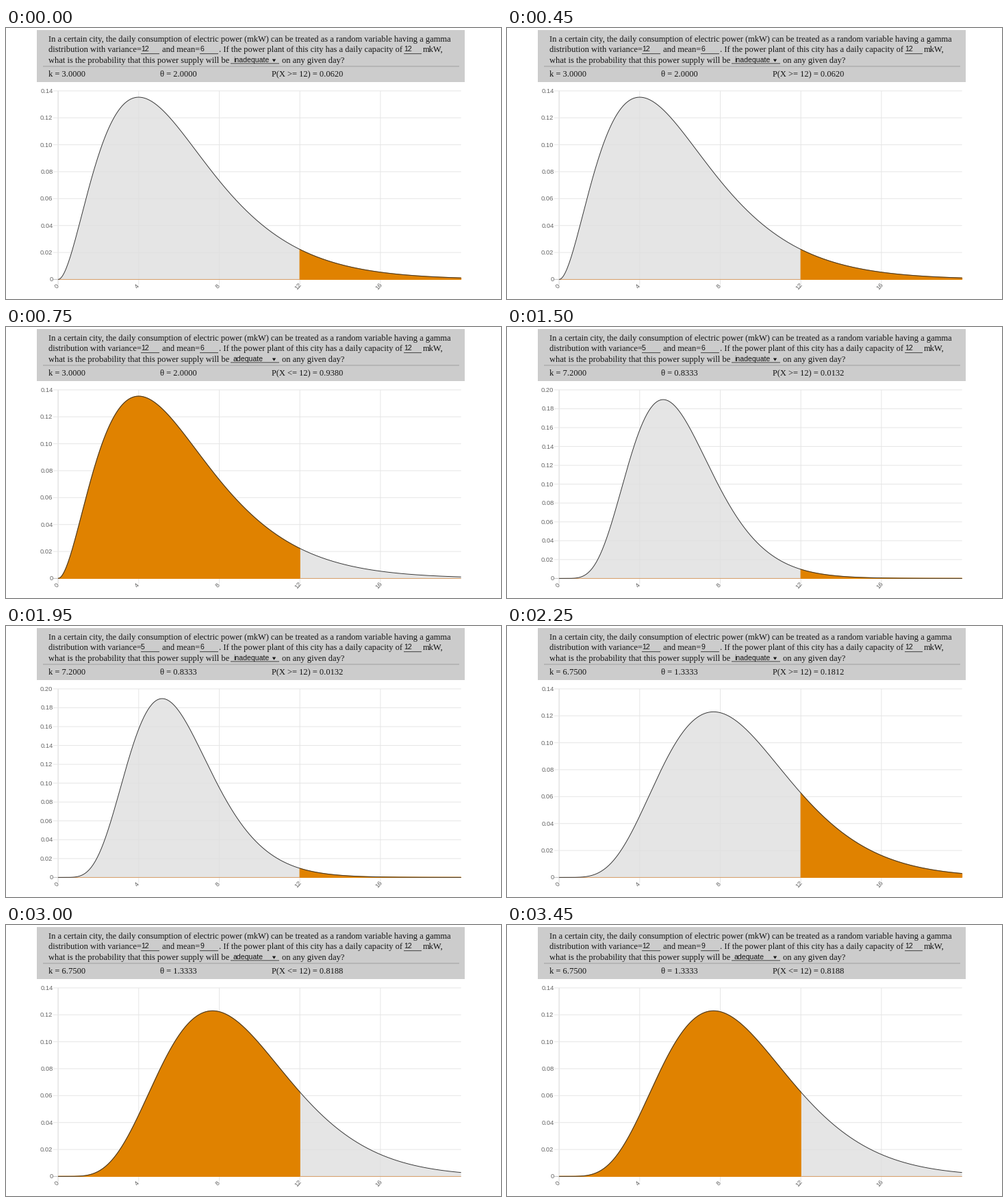
Write a matplotlib script that moves like this. It is 723 by 396 pixels and loops after 3.75 s.

```python
import math

import matplotlib.pyplot as plt
import numpy as np
from matplotlib.animation import FuncAnimation
from matplotlib.patches import Polygon, Rectangle

plt.rcParams["path.snap"] = False

W, H, DPI = 723, 396, 100
PX = 72 / DPI  # points per pixel
SERIF, SANS = "Liberation Serif", "Liberation Sans"
ORANGE, INK = "#e08200", "#141414"
LEFT, RIGHT, TOP, BASE = 76.1, 664.6, 91.9, 367.4
X_MAX, CAPACITY = 20, 12

# variance, mean, "adequate" chosen, top of the y axis
STATES = [
    (12, 6, False, 0.14),
    (12, 6, True, 0.14),
    (5, 6, False, 0.20),
    (12, 9, False, 0.14),
    (12, 9, True, 0.14),
]

fig = plt.figure(figsize=(W / DPI, H / DPI), dpi=DPI, facecolor="white")
ax = fig.add_axes([0, 0, 1, 1])
ax.set(xlim=(0, W), ylim=(H, 0))
ax.axis("off")


def label(x, y, s="", size=12.47, font=SERIF, color=INK, **kw):
    return ax.text(x, y, s, fontsize=size * PX, family=font, color=color, **kw)


def field(x, y, s=""):
    return label(x, y, s, 10.45, SANS)


def tick(x, y, s="", **kw):
    return label(x, y, s, 9.4, SANS, "#666666", **kw)


def line(xs, ys, color, width=1.0, z=1):
    return ax.plot(xs, ys, color=color, lw=width * PX, zorder=z,
                   solid_capstyle="butt")[0]


def area(color, z, **kw):
    shape = Polygon([(0, 0), (1, 0), (0, 1)], facecolor=color, zorder=z, **kw)
    return ax.add_patch(shape)


def to_x(x):
    return LEFT + (RIGHT - LEFT) * x / X_MAX


def to_y(p, top):
    return BASE - (BASE - TOP) * p / top


def gamma_pdf(x, k, theta):
    return x ** (k - 1) * np.exp(-x / theta) / (math.gamma(k) * theta ** k)


# question panel
ax.add_patch(Rectangle((45, 3), 625, 76, facecolor="#cccccc", lw=0))
line([54, 662], [56, 56], "#a0a0a0")
label(62, 20, "In a certain city, the daily consumption of electric power (mkW) "
              "can be treated as a random variable having a gamma")
label(62, 35, "distribution with variance=")
label(228, 35, "and mean=")
label(311, 35, ". If the power plant of this city has a daily capacity of")
label(609, 35, "mkW,")
label(62, 51, "what is the probability that this power supply will be")
label(403, 51, "on any given day?")
field(581, 34, str(CAPACITY))
for x0, x1, y in [(197, 224, 37.6), (283, 310, 37.6),
                  (581, 607, 37.6), (328, 399, 51.9)]:
    line([x0, x1], [y, y], "#444444")
ax.add_patch(Polygon([(388.8, 45.5), (394.2, 45.5), (391.5, 49.7)],
                     facecolor=INK, lw=0))

var_text, mean_text = field(197, 34), field(283.5, 34)
choice_text = field(332, 50)
k_text, theta_text, prob_text = label(62, 71), label(225, 71), label(388, 71)

# axes
for v in range(0, X_MAX, 4):
    x = to_x(v)
    line([x, x], [TOP, 375], "#e6e6e6" if v else "#d6d6d6")
    tick(x - 2.2, 377.5, str(v), rotation=50, ha="center", va="center")
rows = [(line([69, RIGHT], [0, 0], "#e6e6e6" if i else "#c4c4c4"),
         tick(68.5, 0, ha="right")) for i in range(11)]

# distribution
grey = area("#dfdfdf", 2, alpha=0.8, lw=0)
fill = area(ORANGE, 3, edgecolor=ORANGE, lw=1.2 * PX)
floor = line([], [], "#d99a5c", 0.9, 4)
curve = line([], [], "#333333", 0.95, 5)

grid = np.linspace(0, X_MAX, 401)
fine = np.linspace(0, CAPACITY, 20001)


def region(lo, hi, pdf, top):
    keep = (grid >= lo - 1e-9) & (grid <= hi + 1e-9)
    pts = list(zip(to_x(grid[keep]), to_y(pdf[keep], top)))
    return [(to_x(lo), BASE)] + pts + [(to_x(hi), BASE)]


def update(i):
    var, mean, adequate, top = STATES[i]
    k, theta = mean ** 2 / var, round(var / mean, 4)
    pdf = gamma_pdf(grid, k, theta)
    dens = gamma_pdf(fine, k, theta)
    below = float(np.sum(dens[1:] + dens[:-1]) / 2 * (fine[1] - fine[0]))
    prob, sign = (below, "<=") if adequate else (1 - below, ">=")

    var_text.set_text(str(var))
    mean_text.set_text(str(mean))
    choice_text.set_text("adequate" if adequate else "inadequate")
    k_text.set_text(f"k = {k:.4f}")
    theta_text.set_text(f"θ = {theta:.4f}")
    prob_text.set_text(f"P(X {sign} {CAPACITY}) = {prob:.4f}")

    for n, (rule, text) in enumerate(rows):
        shown = n * 0.02 <= top + 1e-9
        rule.set_visible(shown)
        text.set_visible(shown)
        y = to_y(n * 0.02, top)
        rule.set_ydata([y, y])
        text.set_position((68.5, y + 3))
        text.set_text(f"{n * 0.02:.2f}" if n else "0")

    low, high = (0, CAPACITY), (CAPACITY, X_MAX)
    inside, outside = (low, high) if adequate else (high, low)
    fill.set_xy(region(*inside, pdf, top))
    grey.set_xy(region(*outside, pdf, top))
    floor.set_data([to_x(v) for v in outside], [BASE, BASE])
    curve.set_data(to_x(grid), to_y(pdf, top))
    return []


anim = FuncAnimation(fig, update, frames=len(STATES), interval=750,
                     repeat=True, repeat_delay=0, blit=False)
plt.show()
```
